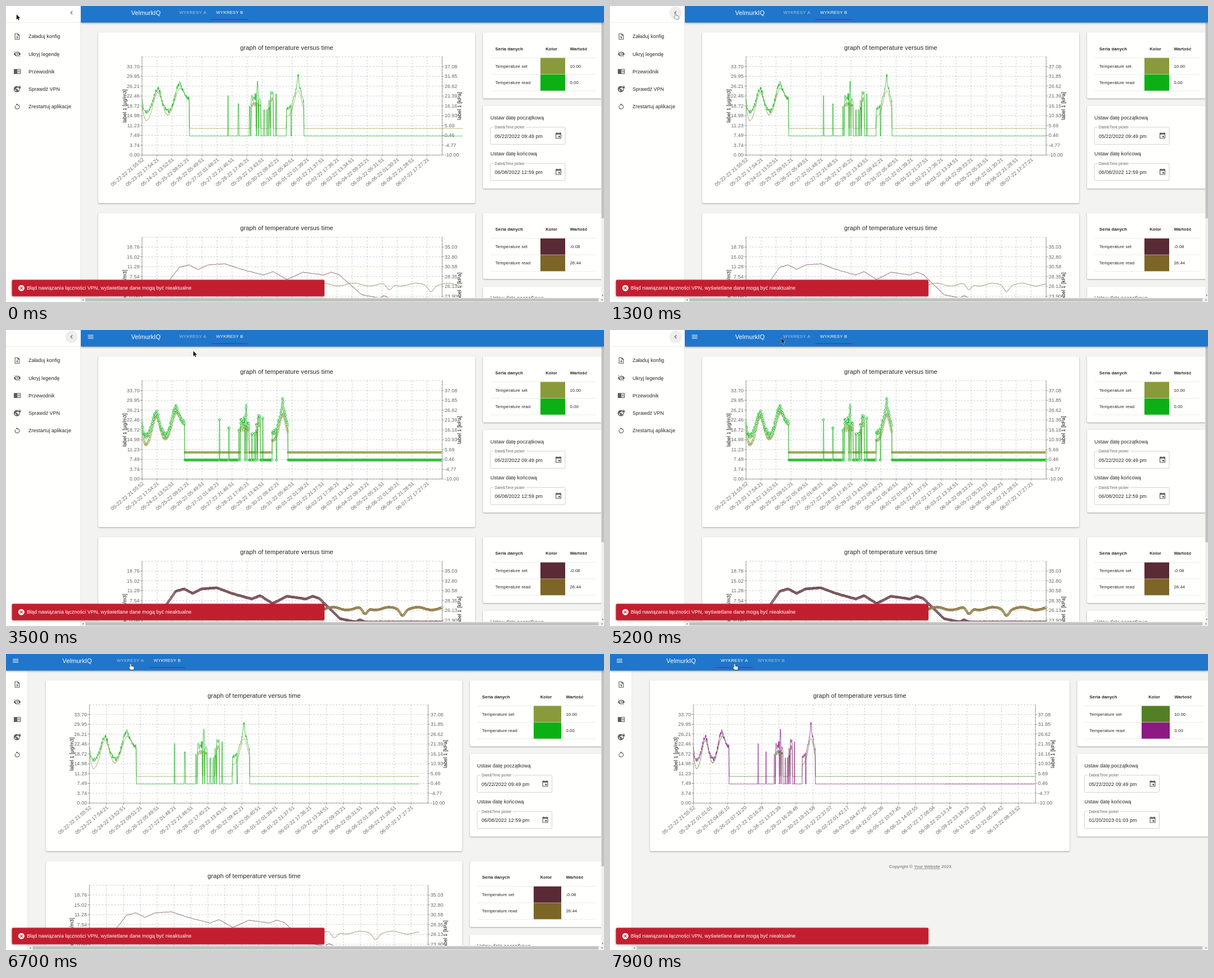
These frames come from a looping animation (1063x527 px, 8000 ms). An HTML page with a canvas:

```html
<!DOCTYPE html>
<html lang="pl">
<head>
<meta charset="utf-8">
<title>Wykresy</title>
<style>
html, body { margin: 0; width: 100%; height: 100%; overflow: hidden; background: #f3f4f1; }
canvas { display: block; }
</style>
</head>
<body>
<canvas id="c" width="1063" height="527"></canvas>
<script>
const g = document.getElementById('c').getContext('2d');
const LOOP = 8000, EM = 8.86, SMALL = 7.75, SPAN = 533.5, UNIT = .5536;
const WHITE = '#fffffd', DARK = '#252525', GREY = '#666', EDGE = '#dededc', ICON_GREY = '#5a5a5a';

// Layouts: open drawer, collapsed drawer, first tab
const OPEN = { drawer: 132.7, bar: 132.7, ham: 150.5, title: 222.5, tabA: 332,
  l: 164, r: 834, x0: 241.8, x1: 775.3, rx: 848, tr: 1048, ca: 950, cb: 994 };
const SHUT = { ...OPEN, drawer: 39, bar: 0, ham: 17, title: 100.3, tabA: 221,
  l: 71, r: 811, x0: 148.3, x1: 750.3, rx: 824.5, ca: 938, cb: 987 };
const FIRST = { ...SHUT, r: 817, x1: 756.3, rx: 830.5, tr: 1056, ca: 945, cb: 995 };

const clamp = v => Math.max(0, Math.min(1, v));
const mix = (a, b, k) => a + (b - a) * k;
const mixAll = (a, b, k) => Object.fromEntries(Object.keys(a).map(n => [n, mix(a[n], b[n], k)]));
const bump = (x, mid, width) => Math.exp(-(((x - mid) / width) ** 2));

// cubic-bezier(.25, .1, .25, 1)
function ease(v) {
  v = clamp(v);
  let lo = 0, hi = 1, u = v;
  for (let i = 0; i < 20; i++) {
    u = (lo + hi) / 2;
    if (.75 * u * (1 - u) + u ** 3 < v) lo = u; else hi = u;
  }
  return .3 * u * (1 - u) ** 2 + 3 * u * u * (1 - u) + u ** 3;
}

// ---- data ----
let seed = 11;
const noise = size => ((seed = seed * 16807 % 2147483647) / 2147483647 - .5) * size;
const sample = f => Array.from({ length: 1068 }, (_, i) => [i / 2, f(i / 2)]);

// short readings between idle stretches: start, width, height on screen
const BURSTS = [[137.3, 1, 160], [154, 1, 174], [172, 1.4, 179], [175, 7.5, 163], [184, 2, 160], [187, 3, 167],
  [195, 1, 185], [200, 1, 184], [203, 1.5, 169], [206, 4, 155], [214.4, 1, 157]];

const READ = sample(x => {
  if (x < 76) return 190 - 26 * bump(x, -2, 4) - 43 * bump(x, 25, 9) - 51 * bump(x, 60, 10) - 20 * bump(x, 76, 7) + noise(9);
  if (x > 231 && x < 259.5 && Math.abs(x - 239) > .6)
    return 183 - 42 * bump(x, 250, 8) - 18 * bump(x, 250, 1.6) + noise(7);
  const burst = BURSTS.find(b => x >= b[0] && x <= b[0] + b[1]);
  return burst ? burst[2] - 27 * bump(x, 185, 1) + noise(burst[1] * 2) : 231.5;
});
const SET = sample(x => {
  if (x < 76) return 209 - .2 * x - 36 * bump(x, -2, 5) - 50 * bump(x, 25, 10) - 50 * bump(x, 61, 12) - 14 * bump(x, 76, 8) + noise(2);
  if (x > 231 && x < 259.5) return 197 - 46 * bump(x, 250, 8.5) + noise(2);
  const burst = BURSTS.find(b => b[1] > 1.4 && x >= b[0] && x <= b[0] + b[1]);
  return burst ? burst[2] + 12 + noise(10) : 218;
});

const SHAPE = [[0, 513], [33, 500], [44, 488], [60, 465], [75, 461], [90, 469], [106, 461], [133, 459], [160, 469],
  [195, 479], [210, 473], [232, 487], [258, 474], [291, 479], [303, 474], [315, 478], [352, 514], [380, 520], [540, 520]];
const LOW = sample(x => {
  const i = SHAPE.findIndex(p => p[0] > x), [a, b] = [SHAPE[i - 1], SHAPE[i]];
  return mix(a[1], b[1], (x - a[0]) / (b[0] - a[0])) - 4 * bump(x, 388, 5) + noise(1);
});
const HIGH = sample(x => 496 + 11 * bump(x, 396, 6) + 10 * bump(x, 463, 6) + 2.5 * Math.sin(x / 8) + noise(1));

// twenty evenly spaced date labels
function dateLabels(from, to) {
  const a = Date.parse(from + 'Z'), b = Date.parse(to + 'Z');
  return Array.from({ length: 20 }, (_, i) => {
    const iso = new Date(mix(a, b, i / 19)).toISOString();
    return `${iso.slice(5, 10)}-22 ${iso.slice(11, 19)}`;
  });
}
const DATES_B = dateLabels('2022-05-22T21:55:52', '2022-06-07T17:27:21');
const DATES_A = dateLabels('2022-05-22T21:55:52', '2022-06-13T08:33:52');

// ---- drawing helpers ----
function text(s, x, y, { size = EM, color = DARK, align = 'left', gap = .0094, bold = '' } = {}) {
  g.font = `${bold} ${size}px "Liberation Sans", Arial, sans-serif`;
  g.letterSpacing = size * gap + 'px';
  g.textAlign = align;
  g.fillStyle = color;
  g.fillText(s, x, y + size * .345);
}
function turned(s, x, y, angle, opt) {
  g.save();
  g.translate(x, y);
  g.rotate(angle);
  text(s, 0, 0, opt);
  g.restore();
}
function rect(x, y, w, h, color) {
  g.fillStyle = color;
  g.fillRect(x, y, w, h);
}
function line(x, y, x2, y2, color, w = .6) {
  g.strokeStyle = color;
  g.lineWidth = w;
  g.beginPath();
  g.moveTo(x, y);
  g.lineTo(x2, y2);
  g.stroke();
}
function clipTo(x, y, w, h) {
  g.save();
  g.beginPath();
  g.rect(x, y, w, h);
  g.clip();
}
function box(x, y, w, h, color, shade = .35, blur = 2.5) {
  g.save();
  g.shadowColor = `rgba(0,0,0,${shade})`;
  g.shadowBlur = blur;
  g.shadowOffsetY = 1;
  g.fillStyle = color;
  g.beginPath();
  g.roundRect(x, y, w, h, 2);
  g.fill();
  g.restore();
}

// icons on a 24 unit grid, cursors in pixels
const ICON = {
  file: 'M14 2H4v20h16V8zm4 18H6V4h7v5h5zM8 15h3v4h2v-4h3l-4-4z',
  eye: 'M1 12C5 2.5 19 2.5 23 12C19 21.500 5 21.500 1 12zM7 12a5 5 0 0 0 10 0a5 5 0 0 0-10 0zM9 12a3 3 0 0 1 6 0a3 3 0 0 1-6 0z',
  book: 'M1 4h22v16H1zM12.5 6v12H21V6zM14 8.5h6V10h-6zM14 11.3h6v1.5h-6zM14 14h6v1.5h-6z',
  globe: 'M15 3.5A10 10 0 1 0 20.5 11h-2a8 8 0 0 1-2 6.300l-3-1.300v-4H7v-2h3V8h5zM4 12l5 5v3A8 8 0 0 1 4 12zM16 4.5h1V3a2.5 2.5 0 0 1 5 0v1.500h1V10h-7zM18 4.5h3V3a1.5 1.5 0 0 0-3 0z',
  restart: 'M12 5V2L8 6l4 4V7a6 6 0 1 1-5 2.500L5.600 8A8 8 0 1 0 12 5z',
  menu: 'M3 18h18v-2H3zm0-5h18v-2H3zm0-7v2h18V6z',
  back: 'M15.4 7.4 14 6l-6 6 6 6 1.4-1.4L10.8 12z',
  date: 'M17 12h-5v5h5zM16 1v2H8V1H6v2H3v18h18V3h-3V1zm3 18H5V8h14z',
  cancel: 'M2 12a10 10 0 0 0 20 0a10 10 0 0 0-20 0zM17 15.600 15.600 17 12 13.400 8.400 17 7 15.600 10.600 12 7 8.400 8.400 7 12 10.600 15.600 7 17 8.400 13.400 12z',
  arrow: 'M0 0V9.2L2.100 7.300 3.600 10.600 5 10 3.600 6.800 6.500 6.600z',
  hand: 'M-1 .8Q0-.6 1 .8V4.200L5 5Q6.200 5.500 6 7L5.200 10.600H.2L-3 6.800Q-2.800 5.400-1 6.600z'
};
for (const name in ICON) ICON[name] = new Path2D(ICON[name]);

function icon(name, x, y, color) {
  g.save();
  g.translate(x, y);
  g.scale(UNIT, UNIT);
  g.translate(-12, -12);
  g.fillStyle = color;
  g.fill(ICON[name], 'evenodd');
  g.restore();
}

// ---- page parts ----
function plot(data, color, x0, width, dots, squeeze) {
  const px = x => x0 + x / SPAN * width * squeeze;
  g.strokeStyle = color;
  g.lineWidth = .75;
  g.beginPath();
  for (const [x, y] of data) g.lineTo(px(x), y);
  g.lineTo(x0 + width, data[data.length - 1][1]);
  g.stroke();
  if (!dots) return;
  g.fillStyle = WHITE;
  for (const [x, y] of data) {
    g.beginPath();
    g.arc(px(x), y, 1.6, 0, 7);
    g.fill();
    g.stroke();
  }
}

function chart(L, dy, left, right, sets, dates, width, dots, squeeze) {
  const { x0, x1 } = L, top = 90.2 + dy, bottom = 265.4 + dy, dx = (x1 - x0) / 20, step = 17.52;
  const grid = '#a3a9c0', tick = { color: GREY, align: 'right' }, label = { color: '#111', align: 'center' };
  box(L.l, 47 + dy, L.r - L.l, 304, WHITE);
  text('graph of temperature versus time', (L.l + L.r) / 2, 74 + dy, { size: 11.07, align: 'center', gap: .0075 });
  g.setLineDash([2.77, 2.77]);
  for (let i = 0; i <= 20; i++) line(x0 + i * dx, top, x0 + i * dx, bottom, grid);
  for (let i = 0; i <= 10; i++) line(x0, bottom - i * step, x1, bottom - i * step, grid);
  g.setLineDash([]);
  for (const x of [x0, x1]) line(x, top, x, bottom, GREY);
  line(x0, bottom, x1, bottom, GREY);
  for (let i = 0; i < 10; i++) {
    const y = bottom - i * step;
    line(x0 - 3.3, y, x0, y, GREY);
    line(x1, y, x1 + 3.3, y, GREY);
    text(left(i).toFixed(2), x0 - 4.4, y, tick);
    text(right(i).toFixed(2), x1 + 4.4, y, { color: GREY });
  }
  dates.forEach((d, i) => {
    const x = x0 + i * dx;
    line(x, bottom, x, bottom + 3.3, GREY);
    turned(d, x + 2, bottom + 6.5, -Math.PI / 4.5, tick);
  });
  turned('label 1 [µg/m3]', x0 - 31, 178 + dy, -Math.PI / 2, label);
  turned('label 1 [kPa]', x1 + 31, 178 + dy, -Math.PI / 2, label);
  clipTo(x0 - 4, 0, x1 - x0 + 41, 519);
  for (const [data, color] of sets) plot(data, color, x0, width, dots, squeeze);
  g.restore();
}

function legend(L, dy, colors, values) {
  const { rx, ca, cb } = L, row = 29.4, top = 92.2 + dy;
  const cell = { size: SMALL, gap: .0107 }, head = { ...cell, bold: 'bold' };
  box(rx, 47 + dy, 1070 - rx, 117.5, WHITE);
  text('Seria danych', rx + 21.8, 76 + dy, head);
  text('Kolor', (ca + cb) / 2 - 2.5, 76 + dy, { ...head, align: 'center' });
  text('Wartość', cb + 8.4, 76 + dy, head);
  ['set', 'read'].forEach((name, i) => {
    const y = top + i * row;
    text('Temperature ' + name, rx + 21.8, y + row / 2, cell);
    text(values[i], cb + 8.4, y + row / 2, cell);
    rect(ca, y, cb - ca, row, colors[i]);
  });
  for (let i = 0; i < 3; i++) line(rx + 13, top + i * row, L.tr, top + i * row, EDGE);
}

function picker(x, y, title, value) {
  text(title, x, y);
  g.strokeStyle = '#bdbdbb';
  g.lineWidth = .7;
  g.beginPath();
  g.roundRect(x, y + 17, 133, 30.5, 2.2);
  g.stroke();
  rect(x + 5.5, y + 15, 58, 4, WHITE);
  text('Date&Time picker', x + 7.7, y + 17, { size: 6.64, color: GREY });
  text(value, x + 7.7, y + 32.7);
  icon('date', x + 121, y + 32.2, ICON_GREY);
}

function dateCard(L, dy, end) {
  box(L.rx, 178 + dy, 1070 - L.rx, 147, WHITE);
  picker(L.rx + 13, 198.8 + dy, 'Ustaw datę początkową', '05/22/2022 09:49 pm');
  picker(L.rx + 13, 263.3 + dy, 'Ustaw datę końcową', end);
}

const MENU = { file: 'Załaduj konfig', eye: 'Ukryj legendę', book: 'Przewodnik', globe: 'Sprawdź VPN', restart: 'Zrestartuj aplikacje' };

function drawer(L, hover) {
  clipTo(0, 0, L.drawer, 527);
  rect(0, 0, L.drawer, 527, WHITE);
  line(0, 29.3, L.drawer, 29.3, EDGE);
  Object.entries(MENU).forEach(([name, label], i) => {
    const y = 54.3 + i * 31.15;
    icon(name, 20, y, ICON_GREY);
    if (name === 'eye') {
      line(15.3, y - 4, 25, y + 5.6, WHITE, 2.2);
      line(14.7, y - 4.7, 24.6, y + 5.2, ICON_GREY, 1);
    }
    if (L.drawer > 45) text(label, 40, y);
  });
  if (L.bar > 20) {
    g.fillStyle = hover ? '#eeeeec' : WHITE;
    g.beginPath();
    g.arc(116.5, 12, 11, 0, 7);
    g.fill();
    icon('back', 116.5, 12, '#555');
  }
  g.restore();
  line(L.drawer - .3, 29, L.drawer - .3, 527, EDGE);
}

function appBar(L, menu, first, slide) {
  clipTo(L.bar, 0, 1063, 40);
  g.shadowColor = 'rgba(0,0,0,.3)';
  g.shadowBlur = 3;
  g.shadowOffsetY = 1;
  rect(L.bar, -4, 1063 - L.bar, 33.5, '#1f76cb');
  g.restore();
  if (menu) icon('menu', L.ham, 12, '#fff');
  text('VelmurkIQ', L.title, 12, { size: 11.07, color: '#fff', gap: .0075 });
  ['A', 'B'].forEach((s, i) => text('WYKRESY ' + s, L.tabA + i * 65.6, 11.8,
    { size: SMALL, align: 'center', gap: .0286, color: first === !i ? '#fff' : 'rgba(255,255,255,.6)' }));
  rect(L.tabA - 32.5 + 65.6 * (1 - slide), 23.8, 65, 1.2, '#7a1fa8');
}

function triangle(x, y, dx, dy) {
  g.fillStyle = GREY;
  g.beginPath();
  g.moveTo(x + dx, y + dy);
  g.lineTo(x - dx + dy, y - dy + dx);
  g.lineTo(x - dx - dy, y - dy - dx);
  g.fill();
}

function scrollbars(x, tall) {
  const track = '#f0f0ee', thumb = '#c1c1bf';
  if (tall) {
    rect(1058, 29.2, 5, 489.8, track);
    rect(1058.5, 30, 4.5, 348, thumb);
    triangle(1060.6, 515.5, 0, 1.3);
  }
  rect(x, 519, 1063 - x, 8, track);
  rect(x + 8.5, 520.5, 1044.5 - x, 5.5, thumb);
  triangle(x + 4, 523.3, -1.3, 0);
  triangle(1060, 523.3, 1.3, 0);
}

// time, x, y
const PATH = [[0, 18.5, 15], [500, 109, 17.5], [800, 116.5, 13], [2400, 116.5, 13], [3300, 339, 38], [3500, 333, 37.5],
  [4000, 314, 30], [4400, 271, 8], [4600, 302, 11], [4900, 304.5, 14.5], [6000, 304.5, 14.5], [6500, 221.5, 17.5], [LOOP, 221.5, 17.5]];

function cursor(t) {
  const i = PATH.findIndex(p => p[0] > t), [t0, x0, y0] = PATH[i - 1], [t1, x1, y1] = PATH[i];
  const k = (t - t0) / (t1 - t0), hand = (t >= 700 && t < 2500) || t >= 6300;
  const shape = hand ? ICON.hand : ICON.arrow;
  g.save();
  g.translate(mix(x0, x1, k), mix(y0, y1, k));
  g.lineJoin = 'round';
  g.lineWidth = 1;
  g.strokeStyle = hand ? '#111' : '#fff';
  g.fillStyle = hand ? '#fff' : '#111';
  g.stroke(shape);
  g.fill(shape);
  g.restore();
}

function draw(t) {
  const first = t >= 7000, dots = t >= 3400 && t < 5800;
  const L = first ? FIRST : mixAll(OPEN, SHUT, t < 5800 ? 0 : clamp((t - 5700) / 200));
  // plotted lines lag behind their axes after every resize
  const [from, to, start] = first ? [602, 608, 7200] : t < 5800 ? [602, SPAN, -195] : [SPAN, 602, 6000];
  const width = mix(from, to, ease((t - start) / 1500));
  const colors = first ? ['#548024', '#8c1a82'] : ['#899a3a', '#0cb014'];

  rect(0, 0, 1063, 527, '#f3f4f1');
  chart(L, 0, i => 3.744 * i, i => 5.2313 * i - 10, [[SET, colors[0]], [READ, colors[1]]],
    first ? DATES_A : DATES_B, width, dots, first ? .735 : 1);
  legend(L, 0, colors, ['10.00', '0.00']);
  dateCard(L, 0, first ? '01/20/2023 01:03 pm' : '06/08/2022 12:59 pm');
  if (first) {
    text('Copyright © Your Website 2023.', 552.5, 378.7, { size: SMALL, color: GREY, gap: .0107, align: 'center' });
    line(540.5, 382.6, 587, 382.6, GREY);
  } else {
    const brown = ['#5a2a35', '#7c6527'], dy = 321.4;
    chart(L, dy, i => 3.74 * i - 14.9, i => 2.2256 * i + 15, [[LOW, brown[0]], [HIGH, brown[1]]], [], width, dots, 1);
    legend(L, dy, brown, ['-0.08', '26.44']);
    dateCard(L, dy, '06/08/2022 12:59 pm');
  }
  scrollbars(L.drawer, !first);
  drawer(L, t >= 700);
  appBar(L, t >= 3400, first, first ? ease((t - 7000) / 300) : 0);
  box(10.6, 487.6, 555.4, 29.2, '#c31e2f', .35, 4);
  icon('cancel', 27.3, 502.2, '#fff');
  text('Błąd nawiązania łączności VPN, wyświetlane dane mogą być nieaktualne', 37, 502, { color: '#fff' });
  cursor(t);
}

const start = performance.now();
function tick() {
  draw((performance.now() - start) % LOOP);
  requestAnimationFrame(tick);
}
tick();
</script>
</body>
</html>
```
